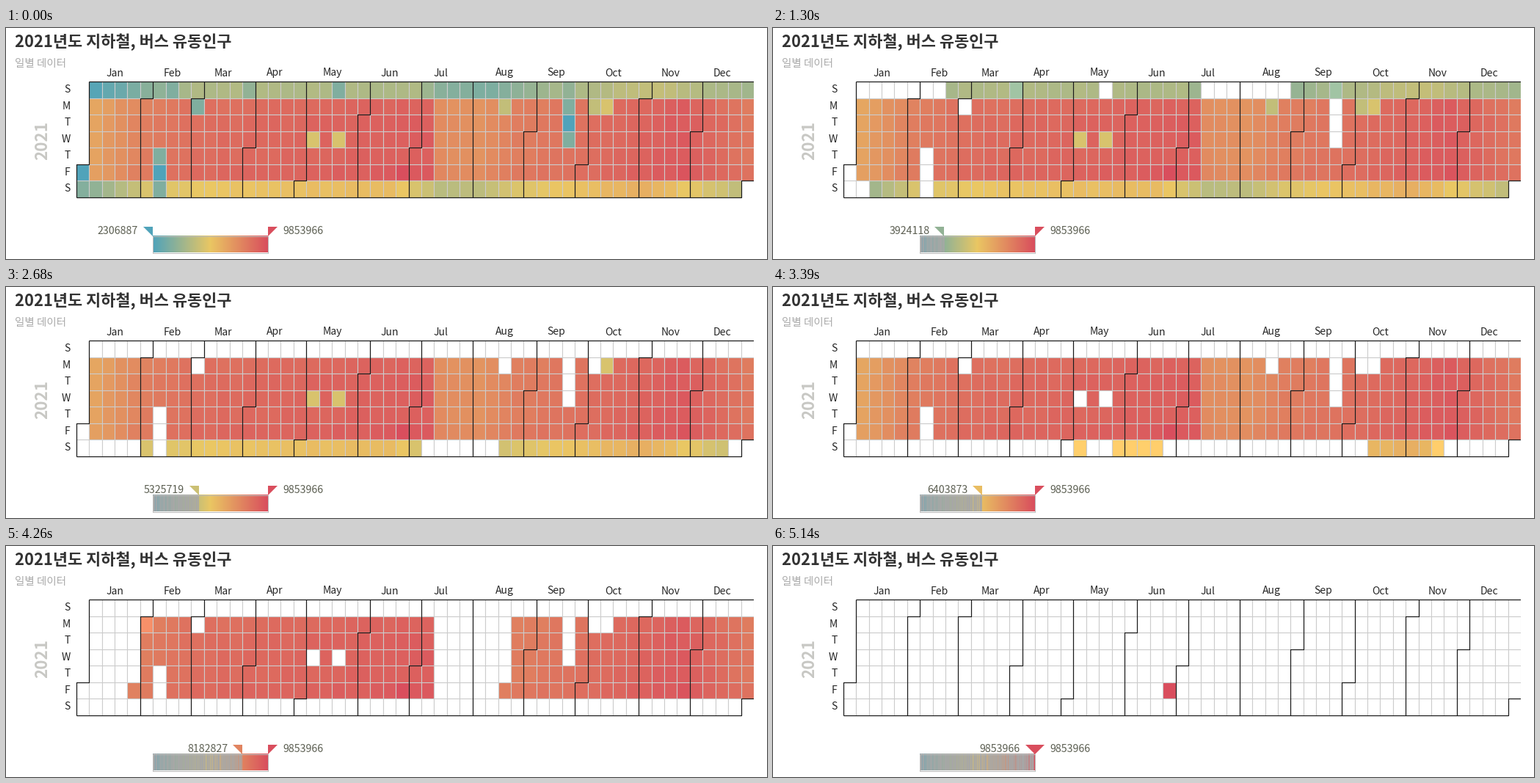
These frames come from a looping animation (1037x315 px, 8000 ms). A matplotlib script:

```python
import numpy as np
import matplotlib.pyplot as plt
from matplotlib.animation import FuncAnimation
from matplotlib.collections import LineCollection, PolyCollection
from matplotlib.patches import Polygon, Rectangle

W, H, DPI = 1037, 315, 100
LOOP, STEP = 8000, 40
LOW, HIGH, SPAN = 2306887, 9853966, 140
FONT = "Noto Sans CJK JP"
BAR_X, BAR_W, BAR_TOP, BAR_BOTTOM = 199.8, 157.0, 284, 306.5
COLS, ROWS = 53, 7
rng = np.random.default_rng(21)

# Time and position of the slider's left handle
KEYS = [(60, 0), (1300, 30), (1780, 40), (2680, 56), (3390, 76), (4260, 109), (5140, 140)]

# Week and traffic level on the 0..140 slider scale
SUNDAY = [(1, 3), (5, 24), (9, 43), (26, 43), (28, 26), (32, 20), (37, 40), (45, 53), (52, 36)]
WORKDAY = [(1, 91), (5, 113), (9, 122), (27, 131), (28, 104), (31, 101), (34, 112), (47, 133),
           (52, 116)]
SATURDAY = [(0, 23), (5, 61), (10, 71), (24, 78), (28, 47), (31, 50), (35, 66), (44, 85),
            (51, 52)]

# Level of holidays and rainy days, given as (weekday, week)
SPECIAL = {0: [(5, 0), (5, 6), (2, 38)],
           22: [(4, 6), (6, 6), (0, 7), (1, 9), (0, 20), (1, 38), (3, 38)],
           30: [(0, 13), (0, 38)],
           52: [(1, 33), (1, 40)],
           62: [(3, 18), (3, 20), (1, 41)],
           SPAN: [(5, 25)]}


def handle_at(t):
    """Handle position, moving in whole steps about 70 ms apart."""
    if t < KEYS[0][0]:
        return 0
    for (t0, p0), (t1, p1) in zip(KEYS, KEYS[1:]):
        if t < t1:
            n = round((t1 - t0) / 70)
            u = int((t - t0) / (t1 - t0) * n) / n
            return round(p0 + u * (p1 - p0))
    return SPAN


def gradient(p):
    stops = np.array([(80, 163, 186), (234, 199, 99), (217, 78, 93)]) / 255
    return np.stack([np.interp(p, [0, 70, 140], stops[:, k]) for k in range(3)], -1)


def build_values():
    """Traffic per weekday row and week column."""
    weeks = np.arange(COLS)
    v = np.empty((ROWS, COLS))
    for row in range(ROWS):
        curve = SUNDAY if row == 0 else SATURDAY if row == 6 else WORKDAY
        v[row] = np.interp(weeks, *zip(*curve)) + rng.uniform(-1.5, 1.5, COLS)
    v[1] -= 2
    v[5] += 2
    v = v.clip(1, SPAN - 1)
    for level, places in SPECIAL.items():
        for place in places:
            v[place] = level
    return v


def col_x(c):
    return np.floor(95.2 + 17.42 * c) + 0.5


def row_y(r):
    return np.floor(72.6 + 22.55 * r) + 0.5


def px(size):
    return size * 72 / DPI


fig = plt.figure(figsize=(W / 100, H / 100), dpi=DPI, facecolor="white")
ax = fig.add_axes([0, 0, 1, 1])


def label(x, y, text, size, color, **kw):
    return ax.text(x, y, text, fontsize=px(size), color=color, family=FONT, **kw)


# Day cells; 1 January is a Friday
slots = [((d + 5) % 7, (d + 5) // 7) for d in range(365)]
values = build_values()
days = np.array([values[s] for s in slots])
colors = gradient(days)
boxes = [[(col_x(c), row_y(r)), (col_x(c + 1), row_y(r)),
          (col_x(c + 1), row_y(r + 1)), (col_x(c), row_y(r + 1))] for r, c in slots]
cells = PolyCollection(boxes, facecolors=colors, edgecolors="#cccccc", linewidths=px(1.1))
ax.add_collection(cells)

# Month outlines and names
borders = [[(col_x(1), row_y(0)), (col_x(53), row_y(0))],
           [(col_x(0), row_y(7)), (col_x(52), row_y(7)),
            (col_x(52), row_y(6)), (col_x(53), row_y(6))]]
names = "Jan Feb Mar Apr May Jun Jul Aug Sep Oct Nov Dec".split()
starts = np.arange("2021-01", "2022-02", dtype="M8[M]").astype("M8[D]")
starts = (starts - starts[0]).astype(int)
for name, first, after in zip(names, starts, starts[1:]):
    r, c = slots[first]
    top = col_x(c + 1) if r else col_x(c)
    borders.append([(top, row_y(0)), (top, row_y(r)), (col_x(c), row_y(r)), (col_x(c), row_y(7))])
    middle = (c + slots[after - 1][1] + 1) / 2
    label(96 + 17.42 * middle, 65.5, name, 14, "#262626", ha="center")
ax.add_collection(LineCollection(borders, colors="#1a1a1a", linewidths=px(1.2)))
ax.add_patch(Rectangle((1019, 60), W - 1019, 180, fc="white", ec="none", zorder=3))

for r, day in enumerate("SMTWTFS"):
    label(87.5, 88 + 22.55 * r, day, 14, "#262626", ha="right")

label(12, 26.5, "2021년도 지하철, 버스 유동인구", 21.9, "#333333", weight="bold")
label(12.5, 52.5, "일별 데이터", 14.5, "#aaaaaa")
label(61, 153, "2021", 22.4, "#c8c8c4", weight="bold", rotation=90, ha="right", va="center")

# Slider bar: gradient where selected, streaked grey elsewhere
ticks = np.linspace(0, SPAN, int(BAR_W) + 1)
active = gradient(ticks)
mix = 0.5 * rng.random(ticks.size)[:, None] ** 2
inactive = (1 - mix) * 0.655 + mix * active
bar = ax.imshow(active[None], extent=(BAR_X, BAR_X + BAR_W, BAR_BOTTOM, BAR_TOP),
                aspect="auto", interpolation="nearest")
ax.add_patch(Rectangle((BAR_X, BAR_TOP), BAR_W, BAR_BOTTOM - BAR_TOP,
                       fc="none", ec="#bbbbbb", lw=px(1)))
ax.set_xlim(0, W)
ax.set_ylim(H, 0)
ax.axis("off")


def triangle(x, side):
    return [(x + 13 * side, 270.5), (x, 270.5), (x, 284)]


left = ax.add_patch(Polygon(triangle(BAR_X, -1), ec="none"))
ax.add_patch(Polygon(triangle(BAR_X + BAR_W, 1), fc=gradient(SPAN), ec="none"))
amount = label(180, 281, "", 14.2, "#5c5f52", ha="right")
label(377.3, 281, str(HIGH), 14.2, "#5c5f52")


def draw(i):
    pos = handle_at((i + 1) * STEP - 1)
    shown = colors.copy()
    if 0 < pos < SPAN:
        near = (days >= pos) & (days < pos + 1)
        shown[near] = np.minimum(shown[near] * 1.1, 1)
    shown[days < pos] = 1
    cells.set_facecolor(shown)

    bar.set_data(np.where((ticks < pos)[:, None], inactive, active)[None])
    x = BAR_X + pos * BAR_W / SPAN
    left.set_xy(triangle(x, -1))
    left.set_facecolor(gradient(pos))
    amount.set_x(x - 20)
    amount.set_text(f"{LOW + pos * (HIGH - LOW) / SPAN:.0f}")
    return cells, bar, left, amount


anim = FuncAnimation(fig, draw, frames=LOOP // STEP, interval=STEP, repeat=True)
plt.show()
```
